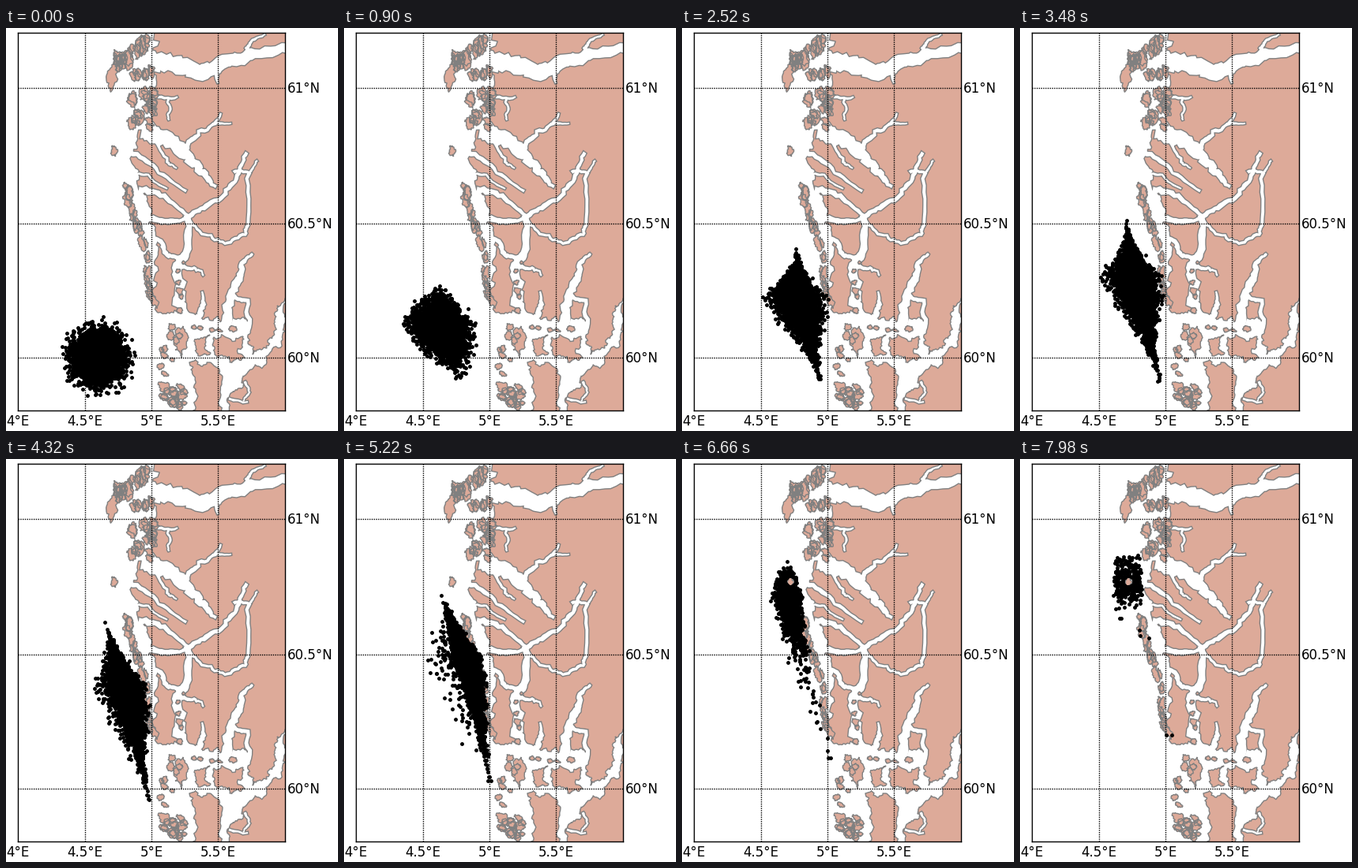
Recreate the animation shown at these times as a matplotlib script. Size 420 by 511 pixels, loop 8 s.

```python
import numpy as np
import matplotlib.pyplot as plt
from matplotlib.animation import FuncAnimation
from matplotlib.patches import PathPatch
from matplotlib.path import Path

W, H, DPI = 420, 511, 100
LAND, COAST = "#ddaa99", "gray"
LEFT, RIGHT, TOP, BOTTOM = 15.2, 352.6, 5.8, 485.2
LOOP, TICK, STEP = 8000, 20, 60

rng = np.random.default_rng(61)
lands, sounds, skerries = [], [], []


def pairs(xy):
    return np.reshape(xy, (-1, 2)).astype(float)


def rough(points, amp, levels):
    """Make a line jagged by midpoint displacement, calmer on long edges."""
    for _ in range(levels):
        a, b = points[:-1], points[1:]
        size = np.hypot(*(b - a).T)[:, None]
        side = (b - a)[:, ::-1] * (1, -1) * np.minimum(1, 16 / size)
        mid = (a + b) / 2 + side * rng.normal(0, amp, (len(a), 1))
        out = np.empty((2 * len(a) + 1, 2))
        out[::2], out[1::2] = points, mid
        points = out
    return points


def loop(points, amp=0.2, levels=4):
    """Closed jagged outline, always turning the same way."""
    p = rough(np.vstack([points, points[:1]]), amp, levels)
    x, y = p.T
    turn = np.sum(x[:-1] * y[1:] - x[1:] * y[:-1])
    return Path(p if turn > 0 else p[::-1], closed=True)


def land(*xy):
    lands.append(loop(pairs(xy)))


def fjord(mouth, head, *xy):
    """Ribbon of water along a line, narrowing from mouth to head."""
    line = rough(pairs(xy), 0.1, 3)
    dx, dy = np.gradient(line, axis=0).T
    normal = np.c_[-dy, dx] / np.hypot(dx, dy)[:, None]
    half = np.linspace(mouth, head, len(line))[:, None] / 2
    bank = [line + s * normal * half * rng.uniform(0.75, 1.3, half.shape)
            for s in (-1, 1)]
    ring = np.vstack([bank[0], bank[1][::-1], bank[0][:1]])
    sounds.append(Path(ring, closed=True))


def islet(x, y, w, h, lean=0.15):
    a = np.arange(0, 2 * np.pi, 0.7)
    r = rng.uniform(0.65, 1.2, len(a))
    px, py = r * np.cos(a) * w / 2, r * np.sin(a) * h / 2
    skerries.append(loop(np.c_[x + px + lean * py, y + py], 0.22, 2))


def scatter(n, w, h, spread, *xy):
    """Islets of varied size strewn along a line."""
    line = pairs(xy)
    at = np.linspace(0, len(line) - 1, n)
    knots = np.arange(len(line))
    for x, y in zip(np.interp(at, knots, line[:, 0]),
                    np.interp(at, knots, line[:, 1])):
        k = rng.uniform(0.6, 1.3)
        islet(x + rng.uniform(-spread, spread), y + rng.uniform(-4, 4),
              w * k, h * k, rng.uniform(-0.1, 0.4))


# Mainland envelope, then the pieces south of the open water
land(186, -10, 190, 60, 190, 125, 166, 138, 164, 178, 178, 212, 187, 250,
     188, 300, 191, 360, 212, 361, 238, 362, 262, 371, 290, 369, 308, 372,
     306, 400, 312, 414, 330, 406, 341, 380, 343, 352, 353, 343, 380, 340,
     380, -10)
land(380, 348, 351, 352, 350, 395, 330, 424, 305, 438, 300, 455, 286, 462,
     284, 495, 380, 495)
land(232, 424, 258, 424, 274, 442, 272, 495, 238, 495, 240, 450)
land(263, 392, 300, 391, 302, 418, 283, 424, 264, 414)
land(243, 394, 258, 389, 259, 412, 243, 416)
land(216, 382, 224, 378, 229, 405, 222, 418, 214, 408)

# Long fjords
fjord(24, 11, 176, 40, 208, 45, 248, 56, 282, 40, 315, 33, 370, 23)
fjord(22, 4, 172, 128, 205, 141, 232, 163, 250, 183, 266, 201)
fjord(6, 4, 226, 241, 250, 228, 278, 210, 295, 184, 305, 158)
fjord(4, 3, 308, 183, 306, 250, 303, 262, 277, 273, 252, 262, 230, 238)
fjord(14, 3, 276, 378, 284, 345, 295, 318, 298, 298, 312, 286)
fjord(15, 7, 223, 374, 221, 340, 217, 308, 228, 285, 229, 240)
# Side arms
fjord(6, 2, 266, 52, 268, 70)
fjord(4, 2, 303, 27, 312, 15, 328, 8)
fjord(4, 2, 184, 88, 217, 87)
fjord(3, 2, 206, 88, 208, 103, 206, 117)
fjord(6, 2, 228, 155, 240, 138, 262, 122, 285, 121)
fjord(3, 2, 262, 122, 272, 108)
fjord(4, 2, 288, 183, 308, 183, 318, 168)
fjord(5, 4, 306, 385, 306, 345, 288, 338)
fjord(5, 2, 222, 302, 238, 304, 250, 314)
fjord(8, 2, 242, 368, 250, 350, 248, 334)
fjord(3, 2, 302, 448, 308, 462, 300, 473)
fjord(3, 2, 282, 470, 306, 474)
# Slanting sounds between the strips of land in the west
fjord(6, 3, 156, 158, 190, 178, 228, 207)
fjord(4, 2, 186, 141, 204, 170, 216, 178)
fjord(3, 2, 158, 181, 180, 186, 204, 204)
fjord(8, 4, 168, 205, 200, 213, 230, 238)
fjord(8, 4, 174, 240, 205, 245, 228, 242)
fjord(6, 5, 180, 262, 196, 270, 204, 288, 222, 292)

islet(137, 156, 9, 12)
islet(133, 62, 13, 34, -0.1)
scatter(17, 9, 21, 6, 138, 46, 152, 38, 180, 14)
scatter(9, 7, 13, 3, 160, 58, 185, 56)
scatter(22, 10, 14, 17, 171, 80, 171, 123)
scatter(5, 9, 18, 2, 152, 198, 157, 226)
scatter(17, 7, 17, 4, 161, 235, 172, 262, 180, 310, 184, 346)
scatter(6, 6, 8, 4, 222, 296, 218, 356)
scatter(10, 9, 9, 12, 208, 382, 206, 436)
scatter(17, 11, 10, 15, 212, 453, 213, 482)
scatter(5, 8, 6, 3, 235, 378, 285, 381)

# Drift of the cloud: time, southern tail, middle, northern tip, width
KEYS = np.array([
    (0, 116, 465, 116, 417, 116, 369, 14.2),
    (900, 145, 442, 121, 379, 119, 328, 15.5),
    (2520, 174, 446, 148, 346, 145, 283, 15),
    (3480, 176, 447, 147, 322, 134, 247, 15),
    (5220, 184, 408, 157, 258, 124, 176, 9),
    (6660, 186, 380, 135, 179, 132, 132, 7.5),
    (7980, 189, 349, 136, 155, 136, 108, 8.5)])
TIMES, VALUES = KEYS[:, 0], KEYS[:, 1:]
SLOPES = np.gradient(VALUES, TIMES, axis=0)

N = 5000
across, along = rng.normal(size=(2, N))
across[:2], along[:2] = (-0.2, 0.2), -3.3
pace, phase = rng.uniform(0.001, 0.004, N), rng.uniform(0, 6.28, N)


def keyed(t):
    """Cubic Hermite interpolation of the drift keys."""
    j = min(np.searchsorted(TIMES, t, "right") - 1, len(TIMES) - 2)
    h = TIMES[j + 1] - TIMES[j]
    s = (t - TIMES[j]) / h
    return ((1 + 2 * s) * (1 - s) ** 2 * VALUES[j]
            + s * (1 - s) ** 2 * h * SLOPES[j]
            + s * s * (3 - 2 * s) * VALUES[j + 1]
            + s * s * (s - 1) * h * SLOPES[j + 1])


def cloud(t):
    k = keyed(t)
    tail, mid, tip, width = k[0:2], k[2:4], k[4:6], k[6]
    age = t / LOOP

    # the spine runs straight to the tip, with extra stretch to the tail
    v = along[:, None] / 3.3
    lag = np.maximum(-v, 0) ** (1 + 6 * age ** 8)
    spine = mid + (tip - mid) * v + (tail + tip - 2 * mid) * lag

    # the ends thin out midway; later the sides flatten against an edge
    taper = 0.32 * np.sin(np.pi * age ** 0.8) ** 2
    squeeze = age ** 4
    u = (1 - squeeze) * across + squeeze * 2 * np.tanh(0.8 * across)
    u = u * np.exp(-taper * along ** 2)
    u = np.where(u > 0, u * (1 - 0.3 * np.sin(np.pi * age)), u)
    arm = np.maximum(0, -across - 1.9) * 18 * np.exp(-((t - 5500) / 900) ** 2)

    x = spine[:, 0] + width * u - arm
    y = spine[:, 1] + arm
    x = x + np.sin(pace * t + phase) - np.sin(phase)
    y = y + np.cos(pace * t + phase) - np.cos(phase)

    # keep clear of the small outer island
    dx, dy = x - 137, y - 155
    push = np.maximum(1, 7 / np.maximum(np.hypot(dx, dy), 0.1))
    n = int(N * (1 - 0.94 * age ** 2.5))
    return (137 + dx * push)[:n], (155 + dy * push)[:n]


fig = plt.figure(figsize=(W / DPI, H / DPI), dpi=DPI, facecolor="white")
ax = fig.add_axes([LEFT / W, 1 - BOTTOM / H,
                   (RIGHT - LEFT) / W, (BOTTOM - TOP) / H])
ax.set(xlim=(LEFT, RIGHT), ylim=(BOTTOM, TOP), xticks=[], yticks=[])
for spine in ax.spines.values():
    spine.set_linewidth(1)

shore = Path.make_compound_path(*lands)
water = Path.make_compound_path(*sounds)
isles = Path.make_compound_path(*skerries)
ax.add_patch(PathPatch(shore, fc=LAND, ec=COAST, lw=1, zorder=1))
banks = ax.add_patch(PathPatch(water, fc="none", ec=COAST, lw=2, zorder=2))
banks.set_clip_path(shore, ax.transData)
ax.add_patch(PathPatch(water, fc="white", ec="none", zorder=2.2))
ax.add_patch(PathPatch(isles, fc=LAND, ec=COAST, lw=1, zorder=2.4))

dotted = dict(color="black", lw=1, ls=(0, (1, 1)), zorder=2.6)
font = dict(family="DejaVu Sans", size=12, va="baseline")
for i, label in enumerate(("4°E", "4.5°E", "5°E", "5.5°E")):
    x = LEFT + i * (RIGHT - LEFT) / 4
    if i:
        ax.axvline(x, **dotted)
    ax.text(x, 504, label, ha="center", **font)
for y, label in ((75.6, "61°N"), (247.9, "60.5°N"), (418, "60°N")):
    ax.axhline(y, **dotted)
    ax.text(355.4, y + 6, label, ha="left", **font)

dots, = ax.plot([], [], "k.", ms=5, zorder=5)


def update(i):
    dots.set_data(*cloud(i * TICK // STEP * STEP))
    return dots,


anim = FuncAnimation(fig, update, frames=LOOP // TICK, interval=TICK,
                     repeat=True, repeat_delay=0)
plt.show()
```
